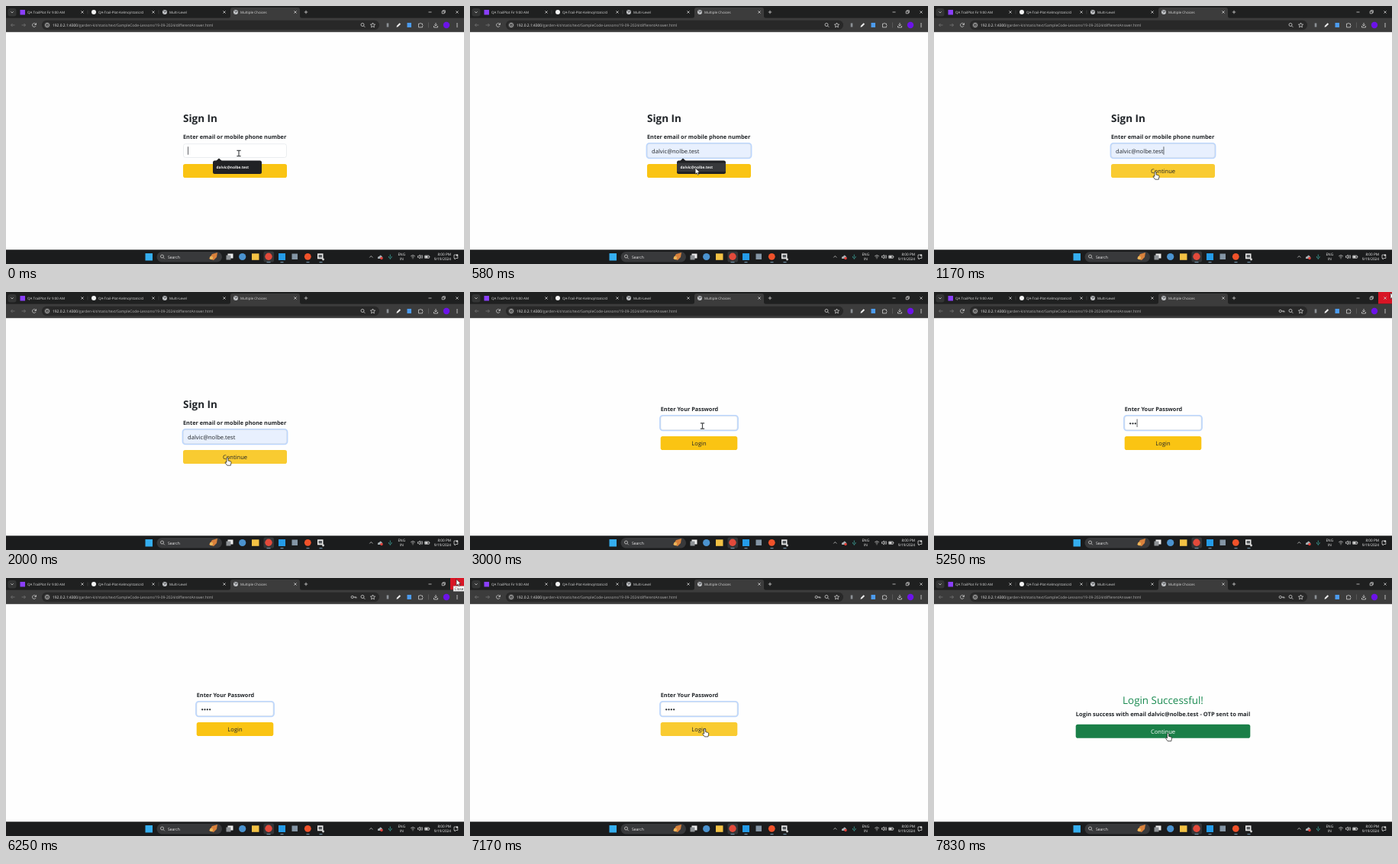
These frames come from a looping animation (600x338 px, 8 s). An HTML page:

```html
<!DOCTYPE html>
<html lang="en">
<head>
<meta charset="utf-8">
<title>Sign in flow</title>
<style>
html, body { margin: 0; width: 100%; height: 100%; overflow: hidden; background: #fefefe; }
svg { display: block; width: 100vw; height: 100vh; }
text { font: 7.6px "Open Sans", "Noto Sans", sans-serif; fill: #212529; text-rendering: geometricPrecision; }
.bold { font-size: 7.35px; font-weight: 700; }
.mid { text-anchor: middle; }
.tab text { font-size: 4.5px; fill: #dcdcdc; }
.tray text { font-size: 4.7px; fill: #f4f4f4; }
.line { fill: none; stroke: #cfcfcf; stroke-width: .8; }
.field { fill: #fff; stroke: #dee2e6; stroke-width: .6; }
.ring { fill: none; stroke: #bcd6fd; stroke-width: 2.2; }
.hot { fill: #f9cb31; }
</style>
</head>
<body>
<svg viewBox="0 0 600 338">
  <defs>
    <g id="x" class="line"><path d="M-1.6-1.6 1.6 1.6M1.6-1.6-1.6 1.6"/></g>
    <g id="globe"><circle r="3" fill="#c9cbce"/><path d="M-2-1.5 0-1 .5 0-1 1.5M1-2.5 1.2-.8 2.5 0" fill="none" stroke="#45474a" stroke-width=".8"/></g>
    <g id="lens" class="line"><circle cx="-.5" cy="-.5" r="2"/><path d="M1 1 2.8 2.8"/></g>
  </defs>

  <!-- tab strip -->
  <g class="tab">
    <rect width="600" height="17" fill="#1f2020"/>
    <rect x="2.5" y="3" width="11" height="10.5" rx="3" fill="#343535"/>
    <path class="line" d="M6.3 7.3 8 9 9.7 7.3"/>
    <path d="M291 16q3 0 3-3V5q0-3 3-3h85q3 0 3 3v8q0 3 3 3z" fill="#3c3c3c"/>
    <rect x="18.5" y="5" width="6.5" height="6.5" fill="#8a3ffc"/>
    <circle cx="115" cy="8" r="3" fill="#f2f2f2"/>
    <use href="#globe" x="208" y="8"/><use href="#globe" x="301" y="8"/>
    <text x="28" y="9.7">QA TrailPlot Fir 9:00 AM</text>
    <text x="121" y="9.7">QA-Trail-Plot-KelmoJ/static/d</text>
    <text x="214" y="9.7">Multi-Level</text>
    <text x="307" y="9.7">Multiple Choices</text>
    <use href="#x" x="100" y="8"/><use href="#x" x="193" y="8"/><use href="#x" x="286" y="8"/><use href="#x" x="379" y="8"/>
    <path class="line" d="M390.8 8h4.4M393 5.8v4.4"/>
    <path d="M107 5.5v5M200 5.5v5" stroke="#555" stroke-width=".5"/>
    <rect id="closeHot" x="582" width="18" height="15.5" fill="#d81525"/>
    <path class="line" d="M553.5 8h4M571.2 6.8h3v3h-3zM572.3 6.8v-1h3v3h-1"/>
    <use href="#x" x="591" y="8"/>
  </g>

  <!-- toolbar -->
  <rect y="15.7" width="600" height="18.5" fill="#3c3c3c"/>
  <rect x="47" y="18.8" width="442" height="12.4" rx="6.2" fill="#282828"/>
  <path class="line" d="M11.5 25h-5m2-2-2 2 2 2M20.5 25h5m-2-2 2 2-2 2" style="stroke:#777"/>
  <path class="line" d="M39.2 24.2a2.4 2.4 0 1 0-.2 2M39.5 22.3v2.2h-2.2"/>
  <circle cx="54" cy="25" r="4.3" fill="#3c3c3c"/>
  <circle class="line" cx="54" cy="25" r="2.5"/><path class="line" d="M54 24.7v1.6M54 23.4v.6"/>
  <text x="61" y="26.8" style="font-size:4.9px;fill:#f2f2f2">192.0.2.1:4300<tspan fill="#b4b4b4">/garden-kit/static/text/SampleCode-Lessons/19-09-2024/differentAnswer.html</tspan></text>
  <g id="keyIcon" class="line"><circle cx="453.7" cy="25" r="1.6"/><path d="M455.3 25h3.7v1.6M457.3 25v1.4"/></g>
  <use href="#lens" x="467.5" y="25"/>
  <path class="line" d="m480.500 22 .9 2 2.2.2-1.700 1.500.5 2.200-1.900-1.200-1.900 1.200.5-2.200-1.700-1.500 2.200-.2z"/>
  <path d="M498.700 22.500h2.600v5h-2.600z" fill="#8c9196"/>
  <path d="m511.500 27.800.6-2 3.500-3.600 1.500 1.500-3.600 3.500z" fill="#eee"/>
  <rect x="525.500" y="22" width="5.500" height="6" fill="#4c9bef"/>
  <path class="line" d="M540.500 23.200h1.700q.8-2 1.600 0h1.700v1.700q1.500.7 0 1.500v1.500h-5z"/>
  <path d="M553.500 21.500v7" stroke="#6a6a6a" stroke-width=".6"/>
  <path class="line" d="M563 22v4m-1.800-1.600L563 26l1.800-1.600M560.500 26v2h5v-2"/>
  <circle cx="577" cy="25" r="4.200" fill="#6c13e8"/>
  <path d="M591 22.500v5.200" stroke="#ddd" stroke-width="1.300" stroke-dasharray="1.200 .8"/>

  <!-- e-mail page -->
  <g id="mail">
    <text x="232" y="152" style="font-size:13.5px;font-weight:700">Sign In</text>
    <text class="bold" x="232" y="173.700">Enter email or mobile phone number</text>
    <rect class="ring" x="231.700" y="180" width="136.600" height="19.200" rx="3.500"/>
    <rect id="mailField" class="field" x="232.500" y="180.700" width="135" height="17.800" rx="2.700"/>
    <text id="address" x="238" y="192.700">dalvic@nolbe.test</text>
    <rect id="mailBtn" x="232" y="207" width="136" height="18" rx="2.800" fill="#fac413"/>
    <text class="mid" x="300" y="219">Continue</text>
    <g id="popup">
      <path d="m275 203.200 4-3.700 4 3.700z" fill="#202124"/>
      <rect x="271" y="202.500" width="64" height="17.500" rx="2.500" fill="#202124"/>
      <rect id="popRow" x="271" y="205.500" width="64" height="11.500" fill="#37383b"/>
      <text x="275.500" y="213" style="font-size:4.800px;font-weight:700;fill:#f4f4f4">dalvic@nolbe.test</text>
    </g>
  </g>

  <!-- password page -->
  <g id="pass">
    <text class="bold" x="249.700" y="155.800">Enter Your Password</text>
    <rect class="ring" x="249.200" y="162" width="101.600" height="19.200" rx="3.500"/>
    <rect class="field" x="250" y="162.700" width="100" height="17.800" rx="2.700"/>
    <g id="dots" fill="#212529"></g>
    <rect id="passBtn" x="249.700" y="189" width="100.600" height="18" rx="2.800" fill="#fac413"/>
    <text class="mid" x="300" y="201">Login</text>
  </g>

  <!-- success page -->
  <g id="done">
    <text class="mid" x="300" y="165.300" style="font-size:13.400px;font-weight:500;fill:#198a50">Login Successful!</text>
    <text class="bold mid" x="300" y="181" style="font-size:7.500px">Login success with email dalvic@nolbe.test - OTP sent to mail</text>
    <rect x="185.700" y="191.700" width="228.600" height="18" rx="2.800" fill="#1a7f48"/>
    <text class="mid" x="300" y="203.900" style="fill:#fff">Continue</text>
  </g>
  <rect id="caret" width=".7" height="10.500" fill="#212529"/>

  <!-- taskbar -->
  <g class="tray">
    <rect y="319.300" width="600" height="19" fill="#1b1c1d"/>
    <rect x="182.500" y="324" width="9.500" height="9.500" fill="#35aef0"/>
    <rect x="197.500" y="322" width="85.500" height="13.500" rx="6.700" fill="#38393b"/>
    <use href="#lens" x="205" y="328.500"/>
    <text x="212" y="330.700" style="font-size:5px">Search</text>
    <path d="m266 331 4-6 7-2-1 6-4 4z" fill="#d8813c"/><circle cx="269" cy="330" r="2.200" fill="#e9b65b"/>
    <path d="M290.500 324.500h7v6h-7z" fill="#ededed"/><path d="M288.500 326.500h6v6h-6z" fill="#8e9296"/>
    <circle cx="309.700" cy="328.500" r="4.600" fill="#4b93cf"/>
    <rect x="322" y="324.300" width="9.500" height="8.500" fill="#f4c244"/>
    <rect x="337.500" y="321.500" width="13.500" height="14" rx="2" fill="#343638"/>
    <circle cx="344" cy="328.300" r="4.700" fill="#e24a3b"/>
    <rect x="357" y="324" width="9" height="9" fill="#249be8"/>
    <rect x="374.500" y="324.500" width="7.500" height="7.500" fill="#8495a5"/>
    <circle cx="395.300" cy="328.300" r="4.400" fill="#f0522a"/>
    <path d="M408 324.300h7.500v7H408z" fill="#e7e7e7"/><path d="M409.500 326h4.500v3.500h-4.500z" fill="#55595d"/>
    <circle cx="415.500" cy="332" r="1.400" fill="#dadada"/>
    <path d="M341.500 335.700h5M359.500 335.700h4M393.500 335.700h4M410.500 335.700h4" stroke="#8db7d4" stroke-width=".9"/>
    <path class="line" d="m476.300 329.500 2-2 2 2"/>
    <path d="M487 331q-.5-3 2-3 1.500-3 3.500 0 1.500 1 .5 3z" fill="#a9b0b4"/><circle cx="492" cy="330.500" r="1.700" fill="#e5403a"/>
    <path class="line" d="M503.300 325.500v3.200M501.300 328q0 2.300 2 2.300t2-2.300m-2 2.300v1.500" style="stroke:#3eaaa0"/>
    <text class="mid" x="518.300" y="326.900">ENG</text>
    <text class="mid" x="518.300" y="333.200">IN</text>
    <path class="line" d="M530.300 327.700q2.700-2.500 5.400 0M531.600 329.200q1.400-1.200 2.800 0M533 330.300v1"/>
    <path class="line" d="M539.500 327.500h1.200l1.600-1.500v5l-1.600-1.500h-1.200zM543.500 327q1.300 1.500 0 3M544.700 326q2 2.500 0 5"/>
    <path class="line" d="M548.700 327h5.500v3.300h-5.500z"/><path d="M549.200 327.500h3.300v2.300h-3.300zM554.500 328h.8v1.300h-.8z" fill="#eee"/>
    <text x="583" y="326.900" text-anchor="end">8:00 PM</text>
    <text x="583" y="333.200" text-anchor="end">9/19/2024</text>
    <path class="line" d="M587 326h3.500m1.300 1.500v3h-2.500l-1.300 1.500v-1.500h-1v-4.500"/><circle cx="591" cy="326.500" r="1.300" fill="#ddd"/>
  </g>

  <g id="tip"><rect x="586" y="10.500" width="16" height="7" fill="#fafafa" stroke="#777" stroke-width=".4"/><text x="587.500" y="15.700" style="font-size:4.700px">Close</text></g>

  <g id="pointer">
    <path id="arrow" d="M0 0v8.300l1.900-1.700 1.300 2.800 1.400-.6-1.300-2.700h2.600z" fill="#fff" stroke="#111" stroke-width=".6"/>
    <path id="hand" d="M-1 1q0-1.200 1-1.200T1 1v3l3 .7q1.200.4 1 1.800l-.7 3.700H-.3L-2.700 7q-.5-1.200.6-1.300L-1 6.300z" fill="#fff" stroke="#111" stroke-width=".7"/>
    <g id="beam" fill="none"><path d="M-2.600-3.700h5.200M0-3.700v7.400M-2.600 3.700h5.200" stroke="#fff" stroke-width="2"/><path d="M-2.600-3.700h5.200M0-3.700v7.400M-2.600 3.700h5.200" stroke="#45484b" stroke-width="1.200"/></g>
  </g>
</svg>
<script>
const LOOP = 8000, PICK = 1080, NEXT = 2250, LOGIN = 7600;
const KEYS = [4830, 5080, 5250, 5420];
const PATH = [ // time, x, y
  [0, 305, 193], [80, 305, 193], [500, 296, 211], [830, 290, 217],
  [2330, 290, 217], [2670, 303, 178], [2830, 304.5, 175.5], [3000, 304.5, 175.5],
  [3330, 430, 100], [3520, 430, 100], [3830, 598, 1], [5830, 598, 1],
  [6080, 590, 1.5], [6480, 590, 1.5], [7100, 308, 196], [7330, 306.5, 203.5]
];
const el = id => document.getElementById(id);
const show = (id, on) => el(id).style.display = on ? '' : 'none';
const clamp = v => Math.max(0, Math.min(1, v));
const rings = document.querySelectorAll('.ring');

el('dots').innerHTML = KEYS.map((k, i) => `<circle cx="${257.2 + i * 3.3}" cy="172.300" r="1.150"/>`).join('');

function pointerAt(t) {
  const i = PATH.findIndex(p => p[0] > t);
  if (i < 0) return PATH.at(-1).slice(1);
  const [a, b] = [PATH[i - 1], PATH[i]];
  const u = (t - a[0]) / (b[0] - a[0]), e = u * u * (3 - 2 * u);
  return [a[1] + (b[1] - a[1]) * e, a[2] + (b[2] - a[2]) * e];
}

function draw(t) {
  const page = t < NEXT ? 'mail' : t < LOGIN ? 'pass' : 'done';
  const [x, y] = pointerAt(t);
  const over = (l, top, r, b) => x >= l && x <= r && y >= top && y <= b;
  const popup = t < PICK, onRow = popup && over(271, 202.5, 335, 220);
  const filled = !popup || onRow;
  const typed = KEYS.filter(k => k <= t).length;

  for (const id of ['mail', 'pass', 'done']) show(id, id === page);
  show('popup', popup);
  show('popRow', onRow);
  show('address', filled);
  el('mailField').style.fill = filled ? '#e8f0fe' : '#fff';
  rings[0].style.opacity = clamp(t / 150);
  rings[1].style.opacity = clamp((t - NEXT) / 150);
  [...el('dots').children].forEach((d, i) => d.style.display = i < typed ? '' : 'none');
  show('keyIcon', typed > 0);

  const onMail = page === 'mail' && !popup && over(232, 207, 368, 225);
  const onPass = page === 'pass' && over(250, 189, 350, 207);
  const onDone = page === 'done' && over(186, 192, 414, 210);
  el('mailBtn').classList.toggle('hot', onMail);
  el('passBtn').classList.toggle('hot', onPass);

  // the caret restarts its blink after every edit
  const edit = page === 'pass' ? (typed ? KEYS[typed - 1] : NEXT) : popup ? 0 : PICK;
  show('caret', page !== 'done' && !onRow && (t - edit) % 1000 < 500);
  const cx = page === 'pass' ? 255.8 + typed * 3.3 : 238.3 + (filled ? el('address').getComputedTextLength() : 0);
  el('caret').setAttribute('x', cx);
  el('caret').setAttribute('y', page === 'pass' ? 166.5 : 184.3);

  const hand = onMail || onPass || onDone;
  const beam = page === 'mail' ? over(232, 180, 368, 199) : page === 'pass' && over(250, 162, 350, 181);
  show('hand', hand);
  show('beam', beam);
  show('arrow', !hand && !beam);
  show('closeHot', over(582, 0, 600, 15.5));
  show('tip', t >= 6080 && t < 6560);
  el('pointer').setAttribute('transform', `translate(${x} ${y})`);
}

function tick(now) {
  draw(now % LOOP);
  requestAnimationFrame(tick);
}
draw(0);
requestAnimationFrame(tick);
</script>
</body>
</html>
```
